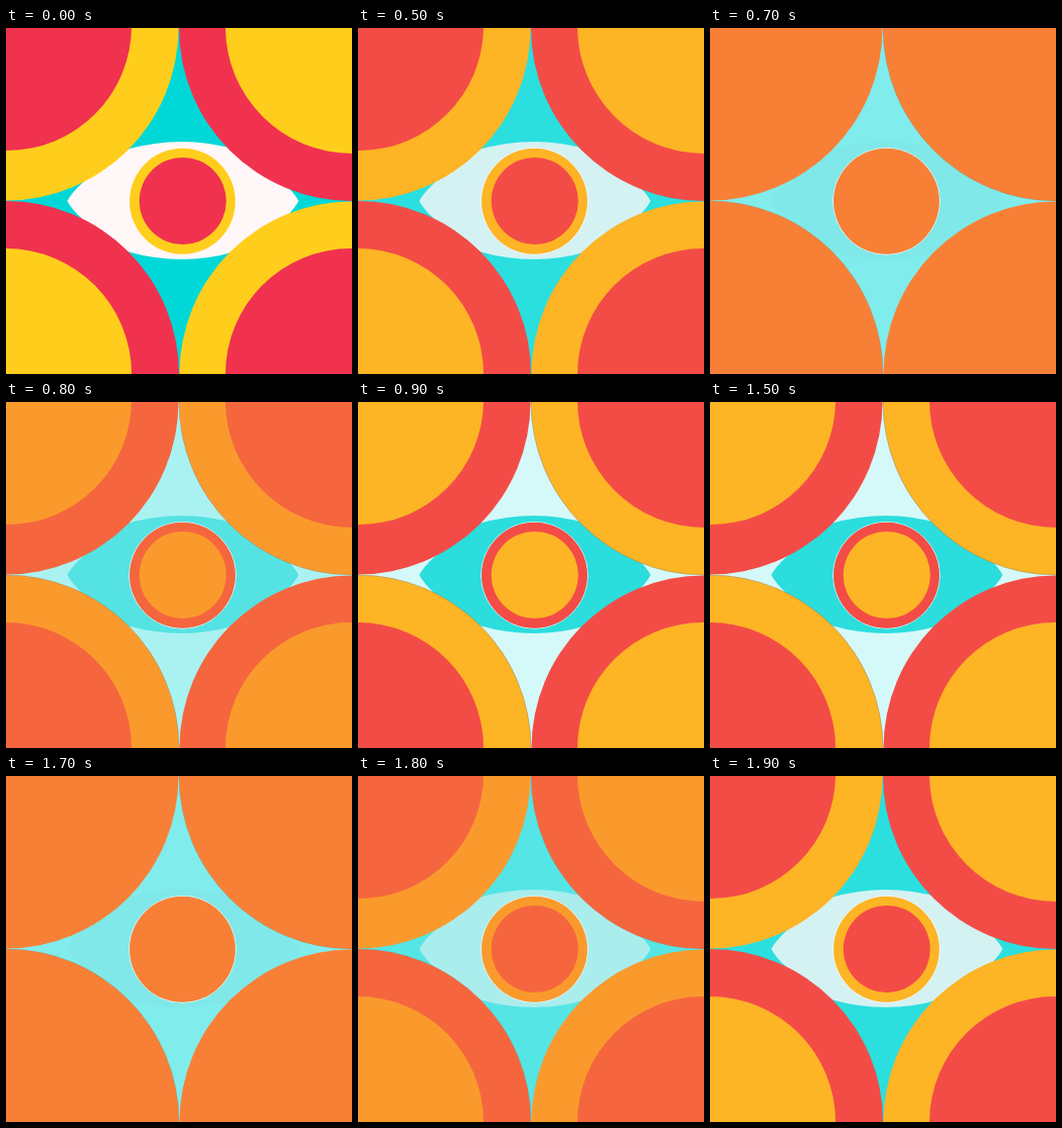
These frames come from a looping animation (350 px wide and 350 px high, 2 s). An HTML page:

```html
<!DOCTYPE html>
<html lang="en">
<head>
<meta charset="utf-8">
<title>Eye</title>
<style>
  html, body { margin: 0; width: 100%; height: 100%; overflow: hidden; }
  svg { display: block; width: 100vw; height: 100vh; }

  .red    { --from: #f0324f; --to: #ffce1c; }
  .yellow { --from: #ffce1c; --to: #f0324f; }
  .ground { --from: #00d8d8; --to: #ffffff; }
  .eye    { --from: #fff7f8; --to: #00d8d8; }

  .red, .yellow, .ground, .eye { animation: swap 2s infinite; }
  .edge { fill: none; stroke: #75685a; stroke-width: .7; animation: show 2s infinite; }
  .rim  { fill: none; stroke: #fff8f8; stroke-width: .9; }

  /* Hold, then cross over in six even jumps of 100 ms */
  @keyframes swap {
    0%   { fill: var(--from); animation-timing-function: step-end; }
    25%  { fill: var(--from); animation-timing-function: steps(5, jump-both); }
    50%  { fill: var(--to);   animation-timing-function: step-end; }
    75%  { fill: var(--to);   animation-timing-function: steps(5, jump-both); }
    100% { fill: var(--from); }
  }
  @keyframes show {
    0%   { opacity: 0;  animation-timing-function: step-end; }
    25%  { opacity: 0;  animation-timing-function: steps(5, jump-both); }
    50%  { opacity: .6; animation-timing-function: step-end; }
    75%  { opacity: .6; animation-timing-function: steps(5, jump-both); }
    100% { opacity: 0; }
  }
</style>
</head>
<body>
<svg viewBox="0 0 350 350">
  <rect class="ground" width="350" height="350"/>
  <path class="eye" d="M62 175Q66 167 78 156L122 123Q179 107 232 123L280 156Q292 167 296 175
    Q292 183 280 194L232 226Q179 242 122 226L78 194Q66 183 62 175Z"/>

  <circle class="yellow" r="174.5"/>
  <circle class="red" cx="1" cy="-2" r="126"/>

  <circle class="red" cx="350" r="175"/>
  <circle class="yellow" cx="350" cy="-1" r="128"/>
  <circle class="edge" cx="350" r="175"/>

  <circle class="red" cy="350" r="175"/>
  <circle class="yellow" cy="350" r="127"/>
  <circle class="edge" cy="350" r="175"/>

  <circle class="yellow" cx="350" cy="350" r="174.5"/>
  <circle class="red" cx="349" cy="350" r="127"/>

  <circle class="rim" cx="178.5" cy="175.3" r="53.9"/>
  <circle class="yellow" cx="178.5" cy="175.3" r="53.5"/>
  <circle class="red" cx="178.8" cy="175" r="44"/>
</svg>
</body>
</html>
```
